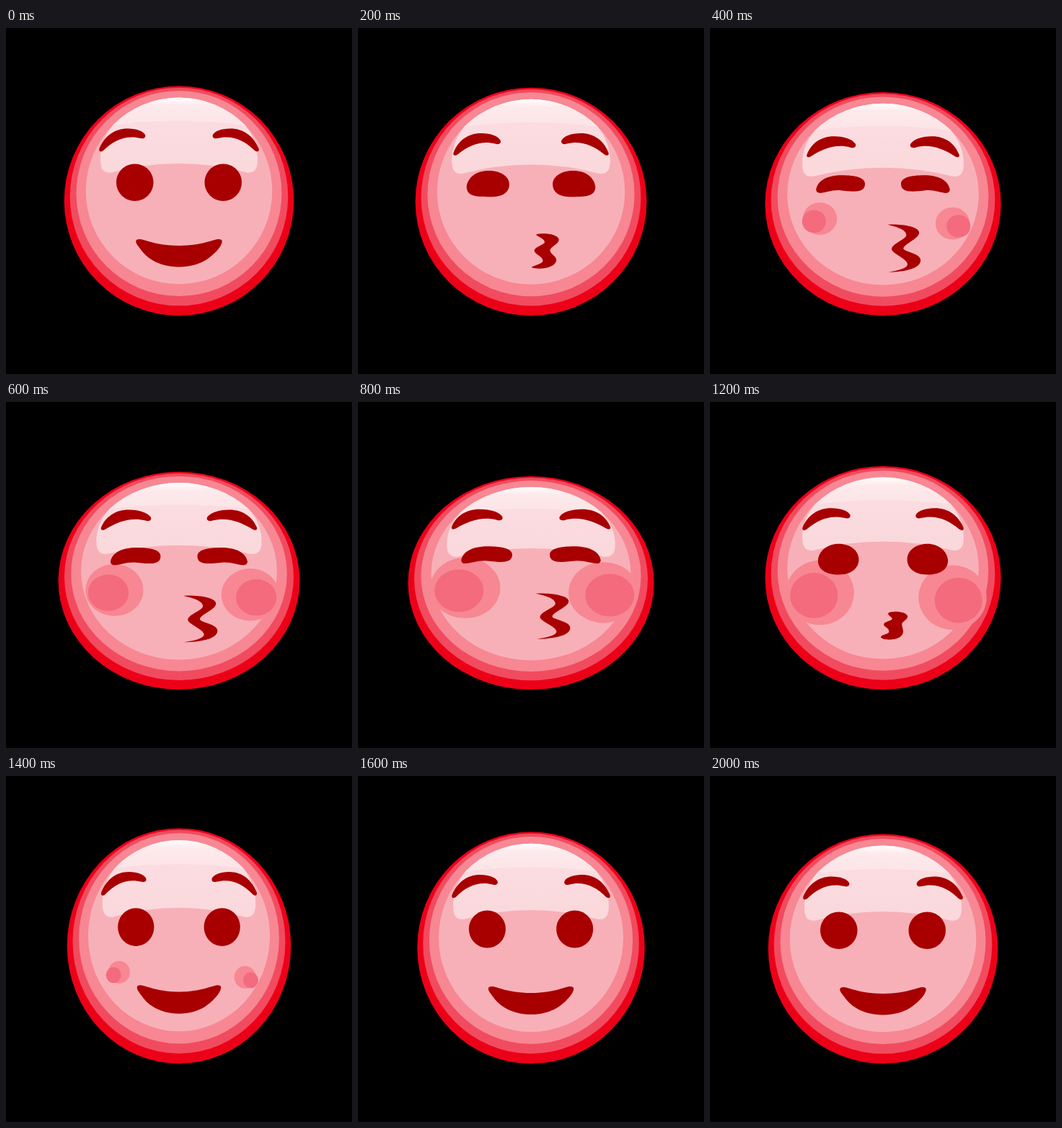
Animation of 480 by 480 pixels, one loop 2100 ms. Source, as an HTML page:

```html
<!DOCTYPE html>
<html lang="en">
<head>
<meta charset="utf-8">
<title>Kissing face</title>
<style>
  html, body { margin: 0; width: 100%; height: 100%; overflow: hidden; background: #000; }
  svg { display: block; width: 100vw; height: 100vh; }
</style>
</head>
<body>
<svg viewBox="0 0 480 480">
  <defs>
    <linearGradient id="shine" gradientUnits="userSpaceOnUse" x1="0" y1="96" x2="0" y2="134">
      <stop offset="0" stop-color="#fff"/>
      <stop offset=".3" stop-color="#fdeaec"/>
      <stop offset="1" stop-color="#fce4e7"/>
    </linearGradient>
    <linearGradient id="gloss" gradientUnits="userSpaceOnUse" x1="0" y1="130" x2="0" y2="200">
      <stop offset="0" stop-color="#fbdce0"/>
      <stop offset="1" stop-color="#fad8dc"/>
    </linearGradient>
  </defs>
  <g id="head">
    <circle cx="240" cy="239.7" r="159.3" fill="#ec0018"/>
    <circle cx="240" cy="234" r="151.3" fill="#f14b5f"/>
    <circle cx="240" cy="229.5" r="142.5" fill="#f78793"/>
    <circle cx="240" cy="226" r="129.3" fill="#f8b0b8"/>
    <path fill="url(#gloss)" d="M240 96.5A129.3 129.3 0 0 0 148 135C137 149 131 165 131 182C131 194 134 202 146 200.5Q193 188 240 188Q287 188 334 200.5C346 202 349 194 349 182C349 165 343 149 332 135A129.3 129.3 0 0 0 240 96.5Z"/>
    <path fill="url(#shine)" d="M240 96.5A129.3 129.3 0 0 0 148 135Q190 129 240 129Q290 129 332 135A129.3 129.3 0 0 0 240 96.5Z"/>
  </g>
  <g id="cheeks">
    <g transform="translate(154.8 268.5)"><circle fill="#f78793"/><circle cx="-8" cy="4" fill="#f36b7c"/></g>
    <g transform="translate(334 275.3)"><circle fill="#f78793"/><circle cx="8" cy="4" fill="#f36b7c"/></g>
  </g>
  <g id="face" fill="#a80000">
    <g id="half"><path id="brow"/><path id="eye"/></g>
    <use href="#half" transform="matrix(-1 0 0 1 480 0)"/>
    <path id="mouth"/>
  </g>
</svg>
<script>
const FRAME = 100, COUNT = 21, BASE = 399, SIZE = 319;
const $ = id => document.getElementById(id);
const clamp = v => Math.min(1, Math.max(0, v));
const ease = k => (1 - Math.cos(Math.PI * clamp(k))) / 2;

// Blends two paths that share the same commands.
function morph(a, b, k) {
  const ends = b.match(/[\d.]+/g);
  let i = 0;
  return a.replace(/[\d.]+/g, v => (+v + (ends[i++] - v) * k).toFixed(2));
}

const brow = {
  open: 'M129.5 167C137 150 150 139.5 169 139.5C181 139.5 190 143 193 148C194.5 152 191 154 187 153C167 148 150 155 135 170C131 173 128 171 129.5 167Z',
  shut: 'M137.4 176.5C143 162 155 151 174 151C188 151 199 155.5 202.8 162C204.5 167 200 168.5 196 167C177 161.5 160 168 143 179.5C138 182.5 136 180 137.4 176.5Z'
};
const eye = {
  open: 'M153 214C153 200 164.5 188.5 178.7 188.5C193 188.5 204.5 200 204.5 214C204.5 228.5 193 240 178.7 240C164.5 240 153 228.5 153 214Z',
  shut: 'M149.6 227C152 213 166 206.5 184 206.5C203 206.5 215.7 210 215.7 219C215.7 232 201 230.5 181 228C164 227.5 151 238 149.6 227Z'
};
const mouth = {
  smile: 'M181 294C188 289.5 200 301.5 240 302C280 301.5 292 289.5 299 294C303 299 290 314 277 322C267 328 254 331.5 240 331.5C226 331.5 213 328 203 322C196 318 190 312 186 306C182 301 180 298 180.3 296C180.3 295 180.6 294.5 181 294Z',
  pucker: 'M247 292C251 288 272 289 273.2 296.5C273.5 302 266 303 265.5 308C266 313 268 317 267 320C265 331 241 332 237 326.5C236 323 247 322 248 319C249 313 241 312 241 308C241 304 252 303 252.5 300C252 297 246 295 247 292Z',
  kiss: 'M245.8 277C262 275.5 289 279 288.8 288.5C288.6 297 269 304 267.5 311C268 316 291 318 290.8 328C290.6 341 266 344.5 246.8 345C262 342 273.5 339 273 333C272.5 326 252 318 251.7 312C252 304 271.5 298 271.5 292C271.5 284 258 280 245.8 277Z'
};
const PUCKER = .25;

// How far the top of the head sinks: squash, rebound, settle.
const drop = t => 25 * ease(t / 10) - 33 * ease((t - 10) / 4)
  + 10 * ease((t - 14) / 4) - 2 * ease((t - 18) / 2);

const kissing = t => ease(t / 4) - ease((t - 10) / 3);

const blush = t => 46 * (1 - (1 - clamp((t - 2) / 6.8)) ** 2) * clamp((15 - t) / 3);

function mouthPath(k) {
  return k < PUCKER
    ? morph(mouth.smile, mouth.pucker, k / PUCKER)
    : morph(mouth.pucker, mouth.kiss, (k - PUCKER) / (1 - PUCKER));
}

function draw(t) {
  const d = drop(t), k = kissing(t), lift = .875 * d;
  const press = (id, up) => $(id).setAttribute('transform',
    `translate(240 ${BASE - up}) scale(${1 + d / SIZE} ${1 - d / SIZE}) translate(-240 ${-BASE})`);
  press('head', 0);
  press('cheeks', lift);
  press('face', lift * k);

  $('brow').setAttribute('d', morph(brow.open, brow.shut, k));
  $('eye').setAttribute('d', morph(eye.open, eye.shut, k));
  $('mouth').setAttribute('d', mouthPath(k));
  document.querySelectorAll('#cheeks circle').forEach((c, i) =>
    c.setAttribute('r', blush(t) * (i % 2 ? .7 : 1)));
}

function tick() {
  draw(Math.floor(performance.now() / FRAME) % COUNT);
  requestAnimationFrame(tick);
}
tick();
</script>
</body>
</html>
```
